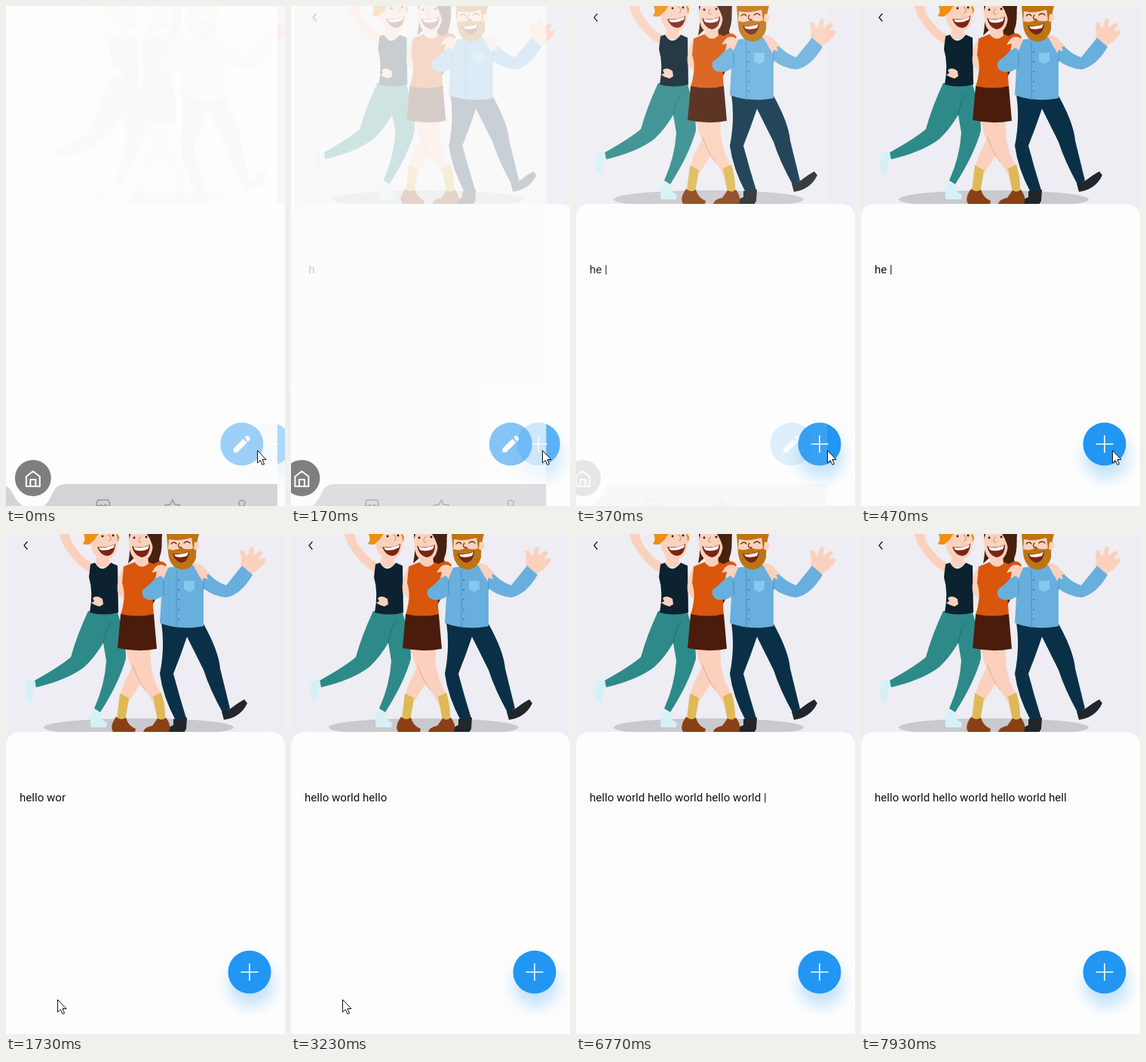
An HTML page for the animation above (8000 ms loop, 370 by 662 pixels).

```html
<!DOCTYPE html>
<html lang="en">
<head>
<meta charset="utf-8">
<title>Typing page</title>
<style>
  html, body { margin: 0; width: 100%; height: 100%; overflow: hidden; background: #fdfdfd; }
  svg { display: block; width: 370px; height: 662px; }
  text { font: 15.1px Roboto, sans-serif; white-space: pre; fill: #111; }
  .line { fill: none; stroke-linecap: round; stroke-linejoin: round; }
  .skin { fill: #fbd1bd; }
  .mouth { fill: #7c2412; }
  .teeth { fill: #fff; }
  .eye { fill: #2a160c; }
</style>
</head>
<body>
<svg viewBox="0 0 370 662">
  <defs>
    <filter id="soft" x="-50%" y="-50%" width="200%" height="200%"><feGaussianBlur stdDeviation="9"/></filter>
  </defs>

  <g id="next">
    <rect width="370" height="662" fill="#fdfdfd"/>
    <rect width="370" height="290" fill="#ededf3"/>
    <ellipse cx="176" cy="256" rx="126" ry="12" fill="#c9c9ce"/>

    <g id="dancer">
      <path class="skin" d="M71 0Q73 13 87 30 98 44 112 51L120 40Q104 36 92 18 85 9 84 0Z"/>
      <path fill="#ee8f14" d="M103 0Q107 7 102 13 112 16 120 9L148 11Q152 5 148 0Z"/>
      <path class="skin" d="M120 26H135L138 44H119Z"/>
      <path class="skin" d="M113 0Q110 14 116 25 123 35 134 34 148 30 148 8L146 0Z"/>
      <path fill="#ee8f14" d="M103 0Q107 7 102 13 115 15 121 2L123 0Z"/>
      <path class="mouth" d="M121 17Q134 19 145 13 144 28 134 29 125 28 121 17Z"/>
      <path class="teeth" d="M123 18Q134 19 144 14L143 18Q134 23 125 21Z"/>
      <path class="line" stroke="#d99a7d" stroke-width="1.3" d="M136 1Q142 6 137 9"/>
      <circle class="eye" cx="128" cy="3" r="1.4"/><circle class="eye" cx="142" cy="2" r="1.4"/>
      <path fill="#2d8a88" d="M109 102L148 104Q159 140 159 165 150 197 125 236L117 231Q131 200 133 168L129 144Q118 163 104 176 82 193 40 203L38 194Q72 175 86 163 94 134 109 102Z"/>
      <path class="line" stroke="#216f70" d="M129 144Q131 128 139 116"/>
      <path fill="#0c2230" d="M112 40L118 38Q127 54 139 38L148 42 149 104Q130 109 111 104 116 78 110 57Z"/>
      <path class="skin" d="M128 86Q120 80 115 85L117 89 113 91 118 94 124 96 129 93Z"/>
      <path fill="#d3f1f6" d="M27 195L38 193Q40 202 36 208L34 222 27 221Q25 208 27 195ZM115 234L126 238Q125 246 134 250L133 256H113Q110 250 115 234Z"/>
    </g>

    <g id="man">
      <path fill="#0a3047" d="M206 117L262 119Q282 155 284 178L297 231 287 236Q270 205 262 180L240 136Q232 160 222 185 230 215 239 244L225 247Q208 215 204 185 211 150 206 117Z"/>
      <path fill="#20262c" d="M222 245L240 243 239 258 236 263H210Q212 257 222 253ZM286 235L298 231Q310 222 316 219L320 224Q311 243 289 246Z"/>
      <path class="skin" d="M311 42Q313 30 310 23L315 21 320 30 324 17 329 18 328 29 337 22 341 25 335 33 344 32 344 37Q335 48 325 53Z"/>
      <path fill="#68afdd" d="M208 46Q235 40 260 42 274 62 292 68L313 42 327 54Q312 80 292 84 274 82 262 72L262 122Q232 128 204 118Z"/>
      <path class="line" stroke="#468fc0" d="M226 48V124M262 54V74"/>
      <path fill="#86c9ee" d="M236 62H250V73L243 77 236 73Z"/>
      <g fill="#2f6f9b"><circle cx="229" cy="61" r="1"/><circle cx="229" cy="74" r="1"/><circle cx="229" cy="87" r="1"/><circle cx="229" cy="100" r="1"/><circle cx="229" cy="113" r="1"/></g>
      <path fill="#bd7414" d="M213 0H256Q252 13 252 31 247 48 233 47 217 45 215 25Z"/>
      <path class="skin" d="M216 7Q229 10 246 5L248 19Q240 22 232 18 225 23 215 20Z"/>
      <path class="skin" d="M250 11Q258 9 256 17 254 23 249 20Z"/>
      <path class="mouth" d="M221 26Q232 28 243 23 242 37 232 38 224 36 221 26Z"/>
      <path class="teeth" d="M223 27Q233 28 242 24L240 29Q232 32 225 30Z"/>
      <path class="line" stroke="#693414" stroke-width="1.3" d="M219 13Q223 9 226 13M236 12Q240 8 244 12M230 12Q226 18 233 18"/>
      <path class="skin" d="M247 39Q257 37 265 47L271 53 266 54 268 60 262 58 261 63 256 55Z"/>
    </g>

    <g id="friend">
      <path fill="#48200f" d="M163 0H205Q209 18 203 33L207 56Q203 84 190 99L184 60Z"/>
      <path fill="#d9560c" d="M196 40Q207 32 213 41L204 62 193 64Z"/>
      <path class="skin" d="M155 45Q146 60 148 77L155 86 159 65Z"/>
      <path class="skin" d="M157 150H190Q192 172 183 191 174 205 163 222L158 246H147Q148 222 156 199L168 174Z"/>
      <path class="skin" d="M159 150H192Q190 180 200 200 211 221 211 246H201Q199 225 185 207 164 183 159 150Z"/>
      <path class="line" stroke="#dfa98b" d="M168 174Q174 192 185 207"/>
      <path fill="#dfb955" d="M151 211L163 217 158 246H147ZM195 215L206 210Q212 228 211 247H201Z"/>
      <path fill="#8a3f16" d="M146 242Q152 248 159 243 162 254 172 258L171 262H142Q137 255 146 242ZM201 244Q207 248 212 243 220 254 216 262H182Q183 256 194 254Z"/>
      <path fill="#d9560c" d="M156 43L171 37Q179 48 189 37L199 41Q201 62 194 79L196 108Q175 112 152 107 160 81 154 65Z"/>
      <path fill="#4b1c0b" d="M152 106Q176 111 196 106L200 152Q174 157 148 151Z"/>
      <path class="skin" d="M173 28H188L189 39Q180 48 171 38Z"/>
      <path fill="#48200f" d="M163 0H172V30L162 39Q166 20 163 0Z"/>
      <path class="skin" d="M165 0Q161 15 166 27 171 37 181 36 194 33 195 13L196 0Z"/>
      <path fill="#48200f" d="M187 0H207Q207 23 196 39 198 16 187 0Z"/>
      <path class="mouth" d="M167 16Q179 20 191 14 191 29 180 31 170 29 167 16Z"/>
      <path class="teeth" d="M169 17Q180 20 190 15L188 20Q179 24 171 21Z"/>
      <path class="line" stroke="#d99a7d" stroke-width="1.3" d="M178 4Q173 10 179 11"/>
      <circle class="eye" cx="170" cy="5" r="1.4"/><circle class="eye" cx="186" cy="4" r="1.4"/>
    </g>

    <g id="hug">
      <path fill="#68afdd" d="M203 52Q194 65 181 74 179 84 188 87 200 89 210 80L213 54Z"/>
      <path class="line" stroke="#468fc0" d="M209 62V81"/>
      <path class="skin" d="M215 45Q205 37 198 44L193 51 200 50 198 59 205 55 209 59Z"/>
    </g>

    <path d="M0 290V282Q0 262 20 262H350Q370 262 370 282V290Z" fill="#fdfdfd"/>
    <path class="line" stroke="#111" stroke-width="1.3" d="M28 10.500L24 15.200 28 20"/>
    <text id="typed" x="18" y="354"></text>
    <circle cx="325" cy="596" r="30" fill="#2196f3" opacity=".25" filter="url(#soft)"/>
    <circle cx="323" cy="580" r="28.500" fill="#2196f3"/>
    <path class="line" stroke="#fff" stroke-width="1.6" d="M312 580H334M323 569V591"/>
  </g>

  <g id="prev">
    <g id="sheet">
      <rect width="370" height="662" fill="#fdfdfd"/>
      <path fill="#d2d2d6" d="M0 633Q13 633 19 645 29 666 46 666 64 666 72 645 77 633 88 633H370V662H0Z"/>
      <g class="line" stroke="#929297" stroke-width="1.5">
        <path d="M132 654H146L148 660Q145 664 142 660 139 664 136 660 133 664 130 660ZM132 662V668"/>
        <path d="M231 654L234 660 241 661 236 666M231 654L228 660 221 661 226 666"/>
        <circle cx="323" cy="658.500" r="4"/>
      </g>
    </g>
    <g id="home">
      <circle cx="46" cy="625" r="24" fill="#7f7f82"/>
      <path class="line" stroke="#fff" stroke-width="2" d="M37 623L46 616 55 623V636H37ZM42.500 636V627H49.500V636"/>
    </g>
    <g id="edit">
      <circle cx="323" cy="580" r="28.500" fill="#2196f3"/>
      <path fill="#fff" d="M312 591V586L325 573 330 578 317 591ZM327 571L329 569Q331 568 333 571 335 573 333 575L331 577Z"/>
    </g>
  </g>

  <path id="mouse" d="M0 0V16.500L3.800 13 6.500 19 9 18 6.500 12H11.500Z" fill="#fff" stroke="#111"/>
</svg>
<script>
  const $ = id => document.getElementById(id);
  const clamp = v => Math.max(0, Math.min(1, v));
  const ease = v => v * v * (3 - 2 * v);
  const progress = (t, from, to) => ease(clamp((t - from) / (to - from)));
  const shift = (id, x, y = 0) => $(id).setAttribute('transform', `translate(${x} ${y})`);
  const fade = (id, a) => $(id).setAttribute('opacity', clamp(a));
  const phrase = 'hello world '.repeat(4);

  function draw(t) {
    // page change: both pages drift left while they cross-fade
    const rest = 27 * clamp(1 - t / 390) ** 2.8;
    const veil = .95 * (1 - clamp(t / 400) ** 1.6);
    shift('next', rest);
    fade('next', .35 + t / 450);
    shift('prev', rest - 37);
    fade('sheet', veil);
    fade('home', veil * 1.6);
    fade('edit', Math.min(.43 + t / 1500, (400 - t) / 220));

    // typewriter with blinking bar
    const count = t < 80 ? 0 : Math.floor((t - 80) / 196.5) + 1;
    const blink = t % 800;
    $('typed').textContent = phrase.slice(0, count) + (blink >= 290 && blink < 700 ? ' |' : '');

    // pointer travels to the lower left, then leaves below
    const go = progress(t, 1130, 1400), out = progress(t, 4900, 5130);
    shift('mouse', 333.5 - 265 * go + 165 * out, 588.5 + 28 * go + 50 * out);
  }

  function frame(now) {
    draw(now % 8000);
    requestAnimationFrame(frame);
  }
  draw(0);
  requestAnimationFrame(frame);
</script>
</body>
</html>
```
